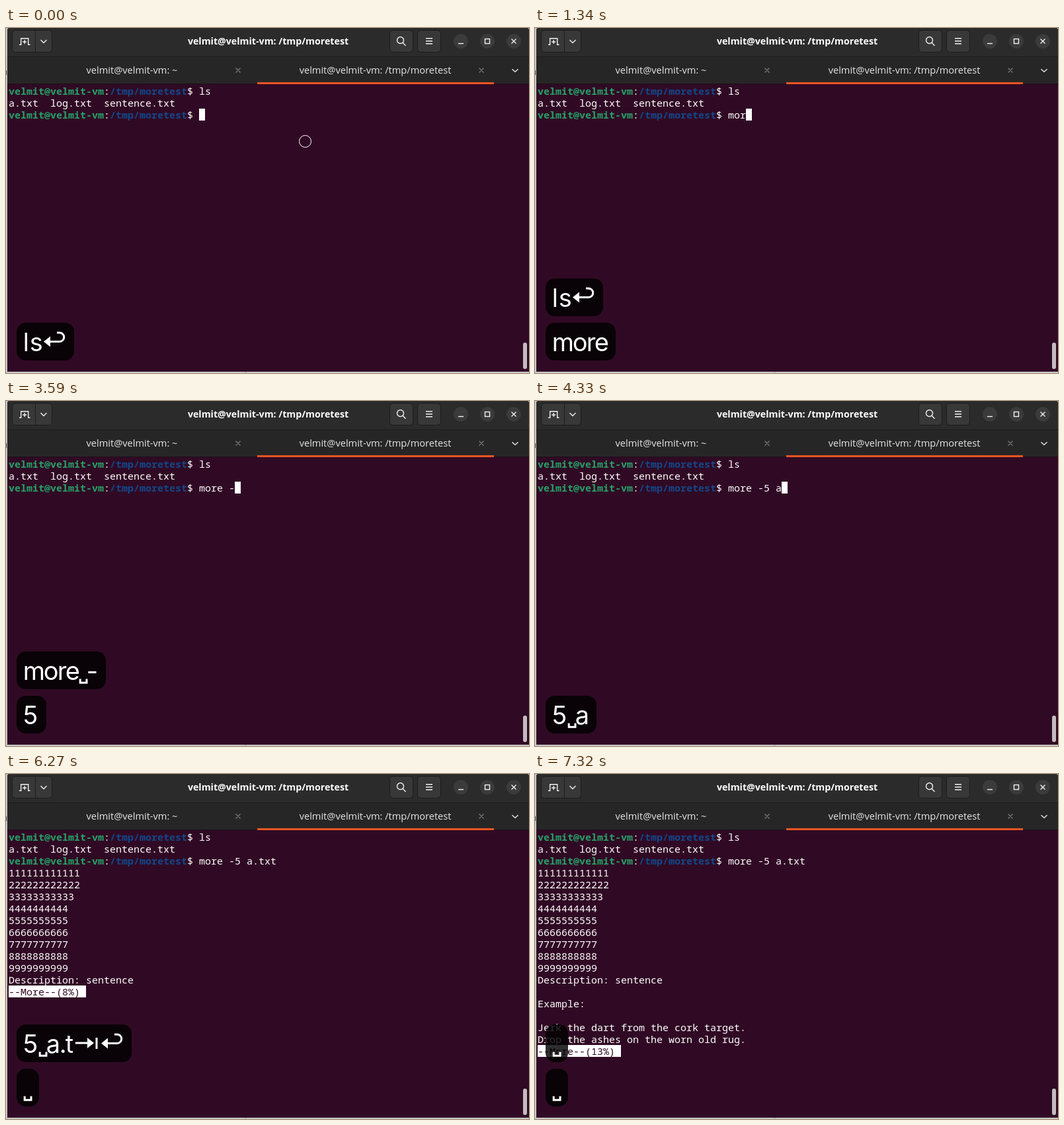
These frames come from a looping animation (791x522 px, 8000 ms). An HTML page:

```html
<!DOCTYPE html>
<html lang="en">
<head>
<meta charset="utf-8">
<title>Terminal pager</title>
<style>
  html, body { margin: 0; width: 100%; height: 100%; overflow: hidden; background: #c8c6c8; }
  svg { display: block; }
  text { white-space: pre; }
  .ui { font: 14.6px "Open Sans", "Noto Sans", sans-serif; fill: #e6e6e6; text-anchor: middle; }
  .title { font-weight: 700; font-size: 14.2px; fill: #fff; }
  .term { font: 15px "Noto Sans Mono", "DejaVu Sans Mono", monospace; fill: #fff; }
  .user { font-weight: 700; fill: #26a269; }
  .dir { font-weight: 700; fill: #12488b; }
  .key { font: 38px Inter, "Liberation Sans", sans-serif; fill: #fff; }
  .line { fill: none; stroke: #f2f2f2; stroke-width: 1.4; }
  .button { fill: #383838; stroke: #1c1c1c; }
  .sign { fill: none; stroke: #fff; stroke-width: 3; }
</style>
</head>
<body>
<svg width="791" height="522" viewBox="0 0 791 522">
  <path d="M0 64h1v7h-1z" fill="#444"/>
  <path d="M362 520h1v2h-1z" fill="#999"/>
  <path d="M2 520V4q0-4 4-4H787q4 0 4 4V520z" fill="#300a24"/>
  <path d="M2 84V4q0-4 4-4H787q4 0 4 4V84z" fill="#262626"/>
  <path d="M2 43V4q0-4 4-4H787q4 0 4 4V43z" fill="#2b2b2b"/>
  <path d="M2 43.5H791" stroke="#1b1b1b"/>
  <path d="M2 84.5H791" stroke="#1d1018"/>
  <path d="M380 82h358v3h-358z" fill="#e95420"/>

  <g class="button">
    <rect x="9.5" y="3.5" width="60" height="33" rx="5"/>
    <path d="M44.5 4v32"/>
    <rect x="580.5" y="3.5" width="35" height="33" rx="5"/>
    <rect x="622.5" y="3.5" width="35" height="33" rx="5"/>
  </g>
  <g fill="#3b3b3b">
    <circle cx="688" cy="20" r="11"/>
    <circle cx="728" cy="20" r="11"/>
    <circle cx="768" cy="20" r="11"/>
  </g>
  <g class="line">
    <path d="M20 25.3h2.7v-9.6h11v9.6h2.8M28.2 18v6M25.2 21h6"/>
    <path d="M52.5 18l4.5 4.5 4.5-4.5"/>
    <circle cx="596.5" cy="18.5" r="5"/>
    <path d="M600 22.2l4.5 4.6"/>
    <path d="M635 15.7h10M635 19.7h10M635 23.7h10"/>
    <path d="M684 23.5h8"/>
    <rect x="724.5" y="16.5" width="7" height="7"/>
    <path d="M764.5 16.5l7 7m0-7l-7 7"/>
    <path d="M765.5 62.2l4.5 4.2 4.5-4.2"/>
    <path d="M347.5 60.5l7 7m0-7l-7 7M715.5 60.5l7 7m0-7l-7 7" stroke="#777"/>
  </g>
  <text class="ui title" x="396.5" y="25">velmit@velmit-vm: /tmp/moretest</text>
  <text class="ui" x="190.5" y="69">velmit@velmit-vm: ~</text>
  <text class="ui" x="558.5" y="69">velmit@velmit-vm: /tmp/moretest</text>
  <rect x="782" y="476" width="6" height="40" rx="3" fill="#c3bbc0"/>

  <g id="screen" class="term"></g>
  <circle id="pointer" cx="452.5" cy="171.5" r="9" fill="none" stroke="#fff"/>
  <g id="keys"></g>
</svg>
<script>
const LOOP = 8000;
const CELL = 9, ROW = 18, LEFT = 4, TOP = 86, PROMPT = 32;

const FILE = [
  '1'.repeat(12), '2'.repeat(12), '3'.repeat(11),
  ...[4, 5, 6, 7, 8, 9].map(n => String(n).repeat(10)),
  'Description: sentence', '', 'Example:', '',
  'Jerk the dart from the cork target.',
  'Drop the ashes on the worn old rug.'
];
const PERCENT = [0, 3, 8, 13];

// Each step changes only what it names; keys run from the lowest pill up,
// and fade is the opacity of the topmost pill.
const STEPS = [
  { at: 0, cmd: '', page: 0, keys: ['ls↵'], fade: 1, pointer: true },
  { at: 140, pointer: false },
  { at: 890, keys: ['m', 'ls↵'] },
  { at: 1040, cmd: 'mo', keys: ['mo', 'ls↵'] },
  { at: 1340, cmd: 'mor', keys: ['more', 'ls↵'] },
  { at: 1490, cmd: 'more' },
  { at: 1640, keys: ['more␣', 'ls↵'], fade: 0.88 },
  { at: 1790, cmd: 'more ', keys: ['more␣-', 'ls↵'], fade: 0.12 },
  { at: 1940, cmd: 'more -', keys: ['more␣-'], fade: 1 },
  { at: 3590, keys: ['5', 'more␣-'] },
  { at: 3740, cmd: 'more -5' },
  { at: 3890, fade: 0.5 },
  { at: 4040, keys: ['5'], fade: 1 },
  { at: 4180, cmd: 'more -5 ', keys: ['5␣'] },
  { at: 4330, cmd: 'more -5 a', keys: ['5␣a'] },
  { at: 4480, cmd: 'more -5 a.', keys: ['5␣a.t'] },
  { at: 4630, cmd: 'more -5 a.t' },
  { at: 4780, cmd: 'more -5 a.txt ', keys: ['5␣a.t⇥'] },
  { at: 5230, page: 1, keys: ['5␣a.t⇥↵'] },
  { at: 6120, keys: ['␣', '5␣a.t⇥↵'] },
  { at: 6270, page: 2 },
  { at: 7170, page: 3, keys: ['␣', '␣', '5␣a.t⇥↵'], fade: 0.5 },
  { at: 7320, keys: ['␣', '␣'], fade: 1 }
];
STEPS.forEach((step, i) => { STEPS[i] = { ...STEPS[i - 1], ...step }; });

const ADVANCE = {
  l: 10, s: 19, m: 31, o: 21, r: 12, e: 20, a: 20, t: 12,
  '.': 9, '-': 17, '5': 23, '␣': 12, '⇥': 40, '↵': 36
};
const SIGNS = {
  '␣': '<path class="sign" stroke-width="2.5" d="M1.2 41.5v5.8h9.8v-5.8"/>',
  '⇥': '<path class="sign" d="M2 28h23M34 20v17"/><path fill="#fff" d="M20 20l10 8-10 8z"/>',
  '↵': '<path class="sign" d="M9 28.5H25a6.5 6.5 0 0 0 0-13.5h-4"/>' +
       '<path fill="#fff" d="M11 20.5v16L1 28.5z"/>'
};

const colX = col => LEFT + col * CELL;
const rowY = row => TOP + row * ROW;

function print(row, content, col = 0, attrs = '') {
  return `<text x="${colX(col)}" y="${rowY(row) + 15}" ${attrs}>${content}</text>`;
}

function block(row, col, cells) {
  return `<rect x="${colX(col)}" y="${rowY(row)}" width="${cells * CELL}" height="${ROW}" fill="#fff"/>`;
}

function promptLine(row, cmd) {
  return print(row, 'velmit@velmit-vm', 0, 'class="user"') + print(row, ':', 16) +
    print(row, '/tmp/moretest', 17, 'class="dir"') + print(row, '$ ' + cmd, 30);
}

function screen({ cmd, page }) {
  let out = promptLine(0, 'ls') + print(1, 'a.txt  log.txt  sentence.txt') + promptLine(2, cmd);
  if (!page) return out + block(2, PROMPT + cmd.length, 1);
  const count = page * 5;
  FILE.slice(0, count).forEach((line, i) => { out += print(3 + i, line); });
  const more = `--More--(${PERCENT[page]}%)`;
  return out + block(3 + count, 0, more.length + 1) +
    print(3 + count, more, 0, 'style="fill:#300a24"');
}

function pill(keys, level, opacity) {
  let x = 11, marks = '';
  for (const key of keys) {
    marks += SIGNS[key]
      ? `<g transform="translate(${x})">${SIGNS[key]}</g>`
      : `<text class="key" x="${x - 1.3}" y="43">${key}</text>`;
    x += ADVANCE[key];
  }
  return `<g transform="translate(16 ${446 - 67 * level})" opacity="${opacity}">` +
    `<rect width="${x + 11}" height="57" rx="14" fill="#000" fill-opacity=".82"/>${marks}</g>`;
}

const byId = id => document.getElementById(id);
let shown;

function draw(time) {
  const step = STEPS.findLast(s => s.at <= time);
  if (step === shown) return;
  shown = step;
  byId('screen').innerHTML = screen(step);
  byId('pointer').setAttribute('visibility', step.pointer ? 'visible' : 'hidden');
  byId('keys').innerHTML = step.keys
    .map((keys, i) => pill(keys, i, i === step.keys.length - 1 ? step.fade : 1))
    .join('');
}

const start = performance.now();
function tick() {
  draw((performance.now() - start) % LOOP);
  requestAnimationFrame(tick);
}
tick();
</script>
</body>
</html>
```
